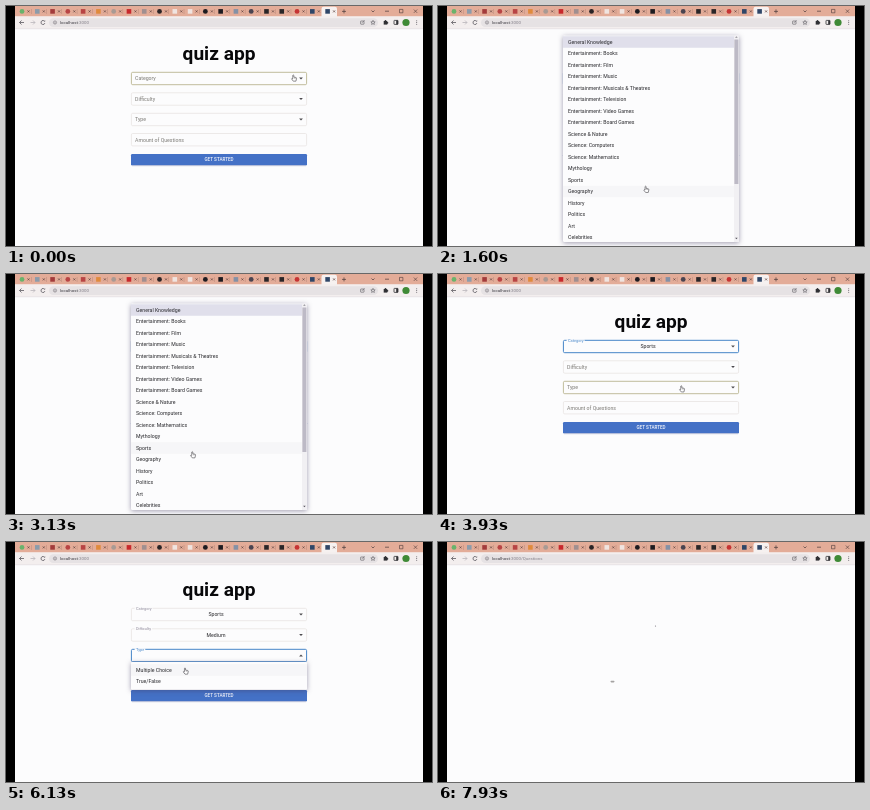
Write an HTML page with a canvas that moves like this. It is 426 px wide and 240 px high and loops after 8 s.

```html
<!DOCTYPE html>
<html lang="en">
<head>
<meta charset="utf-8">
<title>Quiz app</title>
<style>
html, body { margin: 0; width: 100%; height: 100%; overflow: hidden; background: #000; }
canvas { display: block; width: 426px; height: 240px; }
</style>
</head>
<body>
<canvas id="stage"></canvas>
<script>
const W = 426, H = 240, LOOP = 8000, STEP = 1000 / 15;
const canvas = document.getElementById('stage');
const ctx = canvas.getContext('2d');
const ratio = window.devicePixelRatio || 1;
canvas.width = W * ratio;
canvas.height = H * ratio;

const PAGE = '#fcfcfd', BLUE = '#4585c8', INK = '#28282c', ROW = 11.5;
const LEFT = 125, WIDTH = 176;
const LEAVE = 7860;

const topics = ['General Knowledge', 'Entertainment: Books', 'Entertainment: Film',
  'Entertainment: Music', 'Entertainment: Musicals & Theatres', 'Entertainment: Television',
  'Entertainment: Video Games', 'Entertainment: Board Games', 'Science & Nature',
  'Science: Computers', 'Science: Mathematics', 'Mythology', 'Sports', 'Geography',
  'History', 'Politics', 'Art', 'Celebrities'];

const fields = [
  { label: 'Category', y: 72.5, open: 330, close: 3470, value: 'Sports', items: topics,
    first: 36, top: 29.5, bottom: 236 },
  { label: 'Difficulty', y: 93, open: 4270, close: 5130, value: 'Medium',
    items: ['Easy', 'Medium', 'Hard'], first: 107.5, top: 99.5, bottom: 139 },
  { label: 'Type', y: 113.5, open: 5670, close: 6400, value: 'Multiple Choice',
    items: ['Multiple Choice', 'True/False'], first: 128, top: 120, bottom: 147.8 },
  { label: 'Amount of Questions', y: 133.7, open: 6930, close: 7530, value: '5' }
];

// time, x, y of the pointer's centre
const path = [[0, 288, 72], [600, 288, 72], [1450, 208.3, 183.3], [2000, 208.3, 183.3],
  [2800, 187, 180.7], [3470, 187, 180.7], [4150, 262, 94], [4300, 262, 94],
  [4750, 201.5, 119], [5150, 201.5, 119], [5550, 236, 114], [5700, 236, 114],
  [6080, 179.7, 129], [6450, 179.7, 129], [6850, 176, 139], [8000, 176, 139]];

const clamp = v => Math.max(0, Math.min(1, v));
const ease = v => { v = clamp(v); return v * v * (3 - 2 * v); };
const mix = (a, b, k) => a + (b - a) * k;

function pointerAt(t) {
  let i = 1;
  while (i < path.length - 1 && path[i][0] < t) i++;
  const [a, ax, ay] = path[i - 1], [b, bx, by] = path[i];
  const k = ease((t - a) / (b - a));
  return { x: mix(ax, bx, k), y: mix(ay, by, k) };
}

function rect(x, y, w, h, fill) {
  ctx.fillStyle = fill;
  ctx.fillRect(x, y, w, h);
}

function box(x, y, w, h, r, fill, stroke, line = 0.8) {
  ctx.beginPath();
  ctx.roundRect(x, y, w, h, r);
  if (fill) { ctx.fillStyle = fill; ctx.fill(); }
  if (stroke) { ctx.strokeStyle = stroke; ctx.lineWidth = line; ctx.stroke(); }
}

function disc(x, y, r, fill) {
  ctx.beginPath();
  ctx.arc(x, y, r, 0, 7);
  ctx.fillStyle = fill;
  ctx.fill();
}

function lines(color, width, ...strokes) {
  ctx.strokeStyle = color;
  ctx.lineWidth = width;
  ctx.beginPath();
  for (const pts of strokes)
    for (let i = 0; i < pts.length; i += 2) ctx[i ? 'lineTo' : 'moveTo'](pts[i], pts[i + 1]);
  ctx.stroke();
}

function text(str, x, y, size, color, align = 'left', weight = 400) {
  ctx.font = `${weight} ${size}px Roboto, sans-serif`;
  ctx.textAlign = align;
  ctx.fillStyle = color;
  ctx.fillText(str, x, y);
}

function triangle(x, y, dir, color, r = 1.9) {
  ctx.beginPath();
  ctx.moveTo(x - r, y - dir * r / 2);
  ctx.lineTo(x + r, y - dir * r / 2);
  ctx.lineTo(x, y + dir * r / 2);
  ctx.fillStyle = color;
  ctx.fill();
}

function cross(x, y, r, color, width) {
  lines(color, width, [x - r, y - r, x + r, y + r], [x - r, y + r, x + r, y - r]);
}

const tabColors = ['#69b36c', '#8c9cab', '#a33b3b', '#b84444', '#b84444', '#e08a3c', '#a89a94',
  '#c8282c', '#a08f90', '#2a2426', '#f0e4e0', '#f0e4e0', '#1d1b20', '#1d1b20', '#8491a6',
  '#4a4450', '#2a2628', '#2a2628', '#c63434', '#2f4668', '#2f4668'];

function drawBrowser(t) {
  rect(9, 0, 408, 10.5, '#e3ac98');
  box(315.5, 0.8, 15.5, 12, 2, '#f6f1f0');
  tabColors.forEach((color, i) => {
    const x = 16 + i * 15.28;
    if (i % 3 === 0) disc(x, 5.4, 2.4, color);
    else rect(x - 2.3, 3.1, 4.6, 4.6, color);
    cross(x + 6.5, 5.4, 1, '#5c4340', 0.7);
    if (i < 19) rect(x + 9, 3, 0.4, 5, '#b08274');
  });
  const dark = '#4a3a3a';
  lines(dark, 0.7, [336, 5.4, 340, 5.4], [338, 3.4, 338, 7.4]);
  lines(dark, 0.7, [365.5, 4.5, 367, 6, 368.5, 4.5], [379, 5.2, 383, 5.2]);
  box(393.5, 3.4, 3.4, 3.4, 0, null, dark, 0.6);
  cross(409.5, 5.2, 1.7, dark, 0.6);

  rect(9, 10.5, 408, 12.5, '#f3eeee');
  rect(9, 22.6, 408, 0.6, '#dedade');
  const grey = '#5c5a60';
  lines(grey, 0.8, [18, 16.5, 13.5, 16.5], [15.5, 14.5, 13.5, 16.5, 15.5, 18.5]);
  lines('#bab7bc', 0.8, [24.5, 16.5, 29, 16.5], [27, 14.5, 29, 16.5, 27, 18.5]);
  ctx.beginPath();
  ctx.arc(37, 16.5, 2, 0.3, 5.4);
  ctx.strokeStyle = grey;
  ctx.stroke();
  triangle(38.6, 15.3, 1, grey, 1.1);

  box(43, 12.2, 329, 8.8, 4.4, '#e6e2e4');
  ctx.beginPath();
  ctx.arc(49, 16.5, 1.6, 0, 7);
  ctx.strokeStyle = '#77737a';
  ctx.lineWidth = 0.6;
  ctx.stroke();
  rect(48.7, 15.8, 0.6, 1.7, '#77737a');
  const host = 'localhost';
  text(host, 54, 18.1, 4.4, '#3c3a40');
  const hostWidth = ctx.measureText(host).width;
  text(t >= LEAVE ? ':3000/Questions' : ':3000', 54 + hostWidth, 18.1, 4.4, '#85818a');

  box(354.6, 15, 3.4, 3.2, 0.4, null, grey, 0.6);
  lines(grey, 0.6, [356, 16.8, 358.6, 14.2]);
  ctx.beginPath();
  for (let i = 0; i < 10; i++) {
    const r = i % 2 ? 1 : 2.3, a = -Math.PI / 2 + i * Math.PI / 5;
    ctx.lineTo(367 + r * Math.cos(a), 16.6 + r * Math.sin(a));
  }
  ctx.closePath();
  ctx.stroke();
  rect(377.7, 15, 3.6, 3.6, '#303034');
  disc(379.5, 14.9, 0.9, '#303034');
  disc(381.4, 16.8, 0.9, '#303034');
  box(388, 14.4, 4, 4, 0.4, null, '#303034', 0.8);
  rect(390.2, 14.4, 1.8, 4, '#303034');
  disc(400, 16.5, 3.6, '#3f8a36');
  for (const y of [14.7, 16.5, 18.3]) disc(410.7, y, 0.5, grey);
}

function drawField(f, i, t, p, busy) {
  const top = f.y - 6.2, height = 12.4;
  const active = t >= f.open && !(fields[i + 1] && t >= fields[i + 1].open);
  const hover = !busy && !active && Math.abs(p.y - 3 - f.y) < 6.2 && p.x > LEFT && p.x < LEFT + WIDTH;
  const border = active ? BLUE : hover ? '#a8a273' : '#e5e1e0';
  box(LEFT + 0.4, top, WIDTH - 0.8, height, 1.3, null, border, active ? 1 : 0.7);

  const k = ease((t - f.open) / 200);
  const size = mix(5.2, 3.9, k);
  if (k > 0) {
    ctx.font = '400 3.9px Roboto, sans-serif';
    rect(128.6, top - 0.9, (ctx.measureText(f.label).width + 2.4) * k, 1.8, PAGE);
  }
  text(f.label, mix(129, 130, k), mix(f.y + 1.9, top + 1.2, k), size,
    active ? BLUE : k > 0 ? '#8d8899' : '#7b7974');

  if (f.items) {
    if (t >= f.close) text(f.value, 210, f.y + 1.8, 5.2, INK, 'center');
    const open = t >= f.open && t < f.close;
    triangle(295, f.y, open ? -1 : 1, '#4c4a4e');
  } else if (active) {
    if (t >= f.close) text(f.value, 129.5, f.y + 1.8, 5.2, INK);
    triangle(294, f.y - 1.5, -1, '#5c5a60', 1.3);
    triangle(294, f.y + 1.5, 1, '#5c5a60', 1.3);
  }
}

function drawMenu(f, t, p) {
  if (!f.items) return;
  const k = Math.min(ease((t - f.open) / 230), 1 - ease((t - f.close) / 200));
  if (k <= 0) return;
  const height = f.bottom - f.top, long = f.items === topics;
  const mid = long ? f.y : f.top;
  ctx.save();
  ctx.globalAlpha = k;
  ctx.translate(213, mid);
  ctx.scale(mix(0.75, 1, k), mix(0.56, 1, k));
  ctx.translate(-213, -mid);
  ctx.save();
  ctx.shadowColor = 'rgba(70,62,100,.5)';
  ctx.shadowBlur = 5 * ratio;
  ctx.shadowOffsetY = ratio;
  box(LEFT, f.top, WIDTH, height, 1.3, PAGE);
  ctx.restore();
  ctx.beginPath();
  ctx.rect(LEFT, f.top, WIDTH, height);
  ctx.clip();

  const inner = long ? WIDTH - 5 : WIDTH;
  f.items.forEach((item, i) => {
    const y = f.first + i * ROW;
    const over = t > f.open + 230 && Math.abs(p.y - 3 - y) < ROW / 2;
    if (long && i === 0) rect(LEFT, y - ROW / 2, inner, ROW, '#e0dfeb');
    else if (over) rect(LEFT, y - ROW / 2, inner, ROW, '#f6f6f8');
    text(item, 130, y + 1.8, 5.2, INK);
  });
  if (long) {
    rect(296, f.top, 5, height, '#f1f0f3');
    rect(296.4, 33.5, 4, 144.5, '#bdbac6');
    triangle(298.4, 31, -1, '#8c8a90', 1.3);
    triangle(298.4, 232.5, 1, '#55535a', 1.3);
  }
  ctx.restore();
}

function drawHand(x, y) {
  ctx.save();
  ctx.translate(x, y);
  ctx.scale(0.88, 0.88);
  ctx.translate(-3, -4);
  ctx.beginPath();
  ctx.moveTo(1.6, 4.8);
  ctx.lineTo(1.6, 0.9);
  ctx.quadraticCurveTo(2.2, 0, 2.8, 0.9);
  ctx.lineTo(2.8, 3);
  ctx.lineTo(5.2, 3.4);
  ctx.quadraticCurveTo(6, 3.6, 5.9, 4.6);
  ctx.lineTo(5.2, 7.6);
  ctx.lineTo(2.2, 7.6);
  ctx.lineTo(0.2, 5);
  ctx.quadraticCurveTo(0.4, 4, 1.6, 4.8);
  ctx.closePath();
  ctx.fillStyle = '#fff';
  ctx.fill();
  ctx.strokeStyle = '#4a484e';
  ctx.lineWidth = 0.7;
  ctx.stroke();
  lines('#4a484e', 0.4, [3.6, 3.6, 3.6, 4.8], [4.7, 3.8, 4.7, 4.8]);
  ctx.restore();
}

function drawBeam(x, y) {
  lines('#4a4448', 0.8, [x, y - 2.6, x, y + 2.6],
    [x - 1.3, y - 2.8, x + 1.3, y - 2.8], [x - 1.3, y + 2.8, x + 1.3, y + 2.8]);
}

function drawForm(t, p) {
  const busy = fields.some(f => f.items && t >= f.open && t < f.close);
  text('quiz app', 213, 53.6, 19.1, '#08080a', 'center', 700);
  fields.forEach((f, i) => drawField(f, i, t, p, busy));
  box(LEFT, 148, WIDTH, 11.6, 1.3, '#4471c6');
  rect(LEFT + 1, 159.4, WIDTH - 2, 0.8, '#c3c6d6');
  text('GET STARTED', 213, 155.4, 4.6, '#f4f6fc', 'center', 500);
  fields.forEach(f => drawMenu(f, t, p));
}

function draw(t) {
  const p = pointerAt(t);
  ctx.setTransform(ratio, 0, 0, ratio, 0, 0);
  rect(0, 0, W, H, '#000');
  rect(9, 0, 408, H, PAGE);
  drawBrowser(t);
  if (t >= LEAVE) {
    disc(217.5, 84, 0.6, '#77747c');
    box(172.5, 138.8, 4, 1.6, 0.8, '#a5a3a2');
    return;
  }
  drawForm(t, p);
  if (t < 6820) drawHand(p.x, p.y);
  else drawBeam(p.x, p.y);
}

function tick(now) {
  const t = now % LOOP;
  draw(Math.floor((t + 4) / STEP) * STEP % LOOP);
  requestAnimationFrame(tick);
}
requestAnimationFrame(tick);
</script>
</body>
</html>
```
